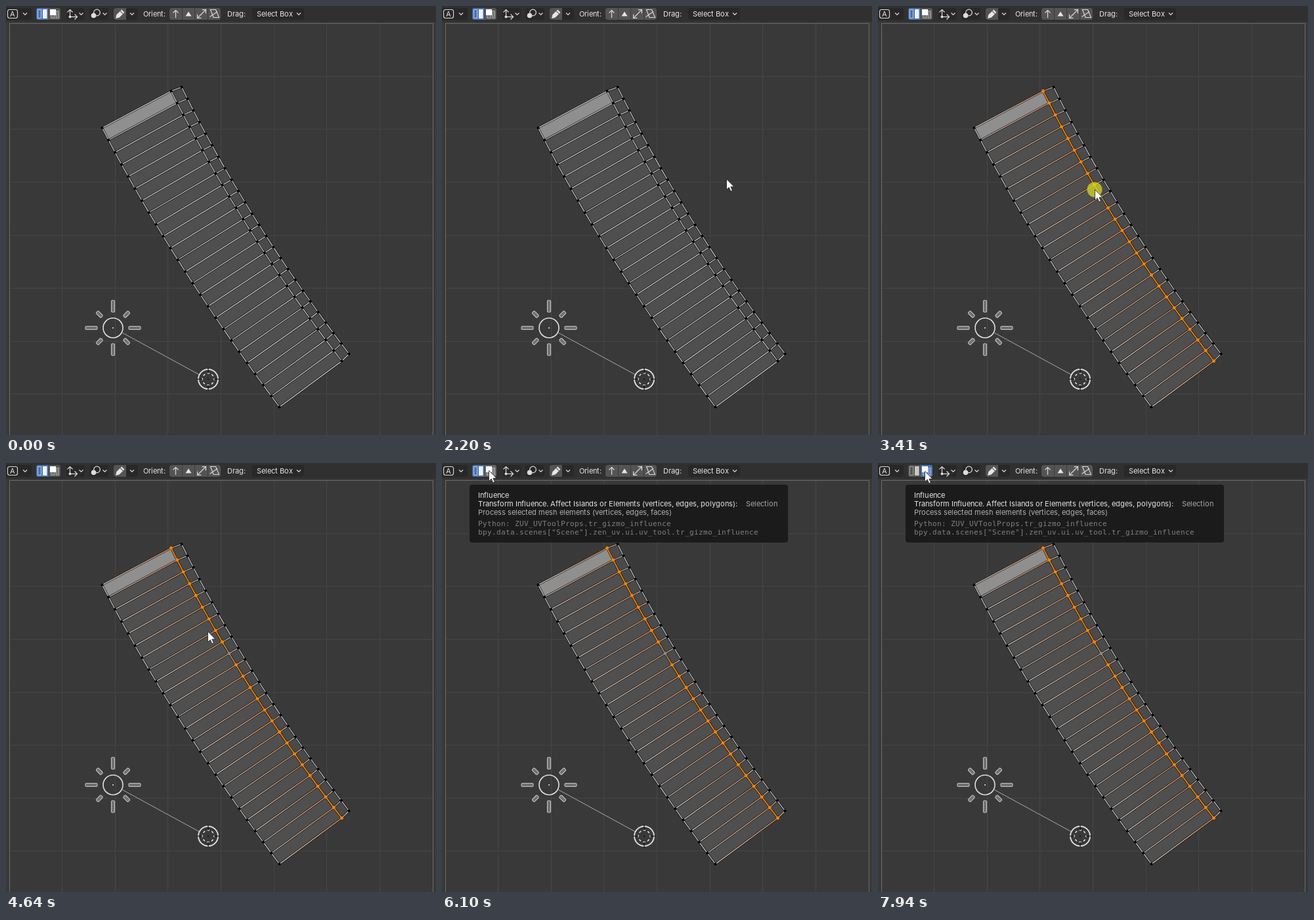
These frames come from a looping animation (655 px wide and 653 px high, 8 s). An HTML page with a canvas:

```html
<!DOCTYPE html>
<html lang="en">
<head>
<meta charset="utf-8">
<title>UV influence tool</title>
<style>
html, body { margin: 0; width: 100%; height: 100%; overflow: hidden; background: #393939; }
canvas { display: block; width: 655px; height: 653px; }
</style>
</head>
<body>
<canvas id="stage" width="655" height="653"></canvas>
<script>
const ctx = document.getElementById('stage').getContext('2d');
const LOOP = 8000, STEP = 76;
const ROWS = 25, ACTIVE = 9;
const UI_FONT = '11px Inter, sans-serif';
const MONO_FONT = '11px "DejaVu Sans Mono", monospace';
const ORANGE = '#ff8500', LIGHT = '#d4d4d4', DARK = '#282828', BUTTON = '#545454', BLUE = '#4772b3';
const ICON = '#dcdcdc';

// The pointer advances in equal time steps; bow bends the path downwards
const entry = [626, 320];
const moves = [
  { at: 600, steps: 3, to: [516, 248] },
  { at: 900, steps: 4, to: [462, 218] },
  { at: 2040, steps: 10, to: [331, 275], bow: 40 },
  { at: 2880, steps: 4, to: [330, 279] },
  { at: 4640, steps: 7, to: [66, 13] },
  { at: 5260, steps: 2, to: [68, 10] },
  { at: 5490, steps: 1, to: [71, 10] },
  { at: 5640, steps: 1, to: [71, 11] },
  { at: 7480, steps: 1, to: [71, 12] }
];

function pointerAt(t) {
  const i = moves.findLastIndex(m => m.at <= t);
  if (i < 0) return null;
  const { at, steps, to, bow = 0 } = moves[i];
  const from = i ? moves[i - 1].to : entry;
  const p = Math.min(1, (Math.floor((t - at) / STEP) + 1) / steps);
  const e = p ** 1.25;
  return [
    Math.round(from[0] + (to[0] - from[0]) * e),
    Math.round(from[1] + (to[1] - from[1]) * e + bow * Math.sin(Math.PI * p))
  ];
}

// Smooth curve through evenly spaced key points, sampled once per row
function curve(...points) {
  const last = points.length - 1;
  return Array.from({ length: ROWS }, (_, row) => {
    const t = row / (ROWS - 1) * last;
    const sum = [.5, .5];
    points.forEach((p, i) => {
      let w = 1;
      for (let j = 0; j <= last; j++) if (j !== i) w *= (t - j) / (i - j);
      sum[0] += p[0] * w;
      sum[1] += p[1] * w;
    });
    return sum;
  });
}
const left = curve([146, 185], [228, 332], [319, 474], [416, 610]);
const middle = curve([251, 129], [329, 272], [416, 409], [511, 540]);
const right = curve([267, 123], [343, 264], [429, 400], [522, 529]);

function path(points, close) {
  ctx.beginPath();
  points.forEach(p => ctx.lineTo(p[0], p[1]));
  if (close) ctx.closePath();
}
function stroke(color, width = 1) {
  ctx.strokeStyle = color;
  ctx.lineWidth = width;
  ctx.stroke();
}
function fill(color) {
  ctx.fillStyle = color;
  ctx.fill();
}
function line(points, color, width) {
  path(points);
  stroke(color, width);
}
function shape(points, color) {
  path(points, true);
  fill(color);
}
function disc(x, y, r, color) {
  ctx.beginPath();
  ctx.arc(x, y, r, 0, Math.PI * 2);
  fill(color);
}
function ring(x, y, r, color, width) {
  ctx.beginPath();
  ctx.arc(x, y, r, 0, Math.PI * 2);
  stroke(color, width);
}
function box(x, y, w, h, color, r = 0) {
  ctx.beginPath();
  ctx.roundRect(x, y, w, h, r);
  fill(color);
}
function at(x, y, angle, paint) {
  ctx.save();
  ctx.translate(x, y);
  ctx.rotate(angle);
  paint();
  ctx.restore();
}
// Hinted type: every glyph advances by whole pixels
function text(str, x, y, color = '#e6e6e6', font = UI_FONT) {
  ctx.font = font;
  ctx.fillStyle = color;
  for (const ch of str) {
    ctx.fillText(ch, x, y);
    x += Math.round(ctx.measureText(ch).width);
  }
}
function fade(a, b, from, to) {
  const g = ctx.createLinearGradient(...a, ...b);
  g.addColorStop(0, from);
  g.addColorStop(1, to);
  return g;
}
function edge(a, b, color, width = 1.1) {
  line([a, b], 'rgba(20,20,20,.75)', width + 1.9);
  line([a, b], color, width);
}

function drawGrid() {
  box(0, 0, 655, 653, '#393939');
  for (let i = 1; i < 8; i++) {
    const x = Math.floor(5 + i * 80.6) + .5;
    const y = Math.floor(26.4 + i * 80.65) + .5;
    line([[x, 26], [x, 653]], '#464646');
    line([[5, y], [650, y]], '#464646');
  }
  line([[5.5, 660], [5.5, 26.5], [650.5, 26.5], [650.5, 660]], '#6c6c6c');
}

function drawMesh(selected) {
  shape([...left, ...middle.toReversed()], '#4f4f4f');
  shape([...middle, ...right.toReversed()], '#4a4a4a');
  shape([left[0], middle[0], middle[1], left[1]], '#8f8f8f');

  const tone = i => !selected ? LIGHT : i === ACTIVE ? '#8f8a84' : ORANGE;
  for (let i = 0; i < ROWS; i++) {
    for (const side of [left, right]) {
      edge(middle[i], side[i], selected ? fade(middle[i], side[i], '#f0985c', '#dcd4d0') : LIGHT);
    }
  }
  for (let i = 1; i < ROWS; i++) {
    edge(left[i - 1], left[i], LIGHT);
    edge(right[i - 1], right[i], LIGHT);
    edge(middle[i - 1], middle[i], fade(middle[i - 1], middle[i], tone(i - 1), tone(i)), selected ? 1.6 : 1.1);
  }
  for (let i = 0; i < ROWS; i++) {
    disc(...left[i], 2, '#000');
    disc(...right[i], 2, '#000');
    disc(...middle[i], selected ? 2.4 : 2, selected ? tone(i) : '#000');
  }
}

function drawGizmo() {
  line([[177.5, 497.5], [295, 561.5]], '#a9a9a9');
  at(163, 490, 0, () => {
    ring(0, 0, 15, '#e0e0e0', 1.6);
    disc(0, 0, 1, '#eee');
    for (let i = 0; i < 8; i++) {
      const length = i % 2 ? 10.5 : 18;
      at(0, 0, i * Math.PI / 4, () => {
        ctx.beginPath();
        ctx.roundRect(24, -2.5, length, 5, 1.5);
        fill('#707070');
        stroke('#c4c4c4', 1.1);
      });
    }
  });
  at(308, 568, 0, () => {
    ring(0, 0, 15, '#e0e0e0', 1.9);
    const dash = Math.PI * 9 / 8;
    ctx.setLineDash([dash, dash]);
    ctx.lineDashOffset = dash / 2;
    ring(0, 0, 9, '#e8e8e8', 1.5);
    ctx.setLineDash([]);
    for (let i = 0; i < 4; i++) {
      at(0, 0, i * Math.PI / 2, () => line([[9, 0], [17, 0]], '#101010', 1.2));
    }
    disc(0, 0, 1.1, '#111');
  });
}

function chevron(x) {
  line([[x - 3, 10.5], [x, 13.5], [x + 3, 10.5]], ICON, 1.2);
}
// Arrow along the local x axis with its tip at the given length
function arrow(x, y, angle, length) {
  at(x, y, angle, () => {
    line([[0, 0], [length, 0]], ICON, 1.2);
    line([[length - 4, -4], [length, 0], [length - 4, 4]], ICON, 1.2);
  });
}

function drawInfluence(elements, hover) {
  box(46, 3, 18.5, 18, elements ? BUTTON : BLUE, [3, 0, 0, 3]);
  box(65, 3, 18, 18, elements ? BLUE : hover ? '#656565' : BUTTON, [0, 3, 3, 0]);
  ctx.beginPath();
  ctx.rect(48.5, 5.5, 5, 13);
  stroke(elements ? '#a5a59a' : '#bfd0ea');
  box(56, 5, 6.5, 14, elements ? '#c9c9b8' : '#f2f2f2');
  ctx.beginPath();
  ctx.rect(68.5, 12.5, 6, 6);
  ctx.rect(76.5, 7.5, 4, 11);
  fill('rgba(255,255,255,.2)');
  stroke('rgba(255,255,255,.4)');
  box(67, 5, 9, 9, '#fff');
}

function drawHeader(elements, hover) {
  box(0, 0, 655, 24, '#303030');
  for (const [x, width] of [[-4, 43], [92, 28], [127, 29], [164, 37], [375, 79]]) {
    box(x, 3, width, 18, DARK, 4);
    chevron(x + width - (x === 164 ? 9 : x === 375 ? 8 : 5.5) - (x < 0 ? 4.5 : 0));
  }

  ctx.beginPath();
  ctx.roundRect(2.5, 5.5, 15, 13, 3);
  stroke(ICON, 1.1);
  text('A', 6, 16);
  drawInfluence(elements, hover);

  arrow(97.5, 16.5, -Math.PI / 2, 11);
  arrow(97.5, 16.5, 0, 11);
  disc(97.5, 16.5, 2, ICON);

  ring(138.5, 10, 4.8, ICON, 1.3);
  disc(133.5, 14.5, 3.8, ICON);

  box(164, 3, 19, 18, BUTTON, [4, 0, 0, 4]);
  at(167, 19, -Math.PI / 4, () => {
    shape([[0, 0], [5, -3], [16, -3], [16, 3], [5, 3]], '#e6e6e6');
    line([[13, -3], [13, 3]], BUTTON);
  });

  text('Orient:', 209, 16);
  box(249, 3, 78, 18, BUTTON, 4);
  for (let i = 1; i < 4; i++) box(249 + Math.round(i * 19.5) - 1, 3, 1, 18, '#3c3c3c');
  arrow(258.5, 18, -Math.PI / 2, 11.5);
  shape([[273.5, 15.5], [278, 8.5], [282.5, 15.5]], '#e6e6e6');
  arrow(298, 12, -Math.PI / 4, 9);
  arrow(298, 12, Math.PI * 3 / 4, 9);
  path([[311.5, 5.5], [319.5, 5.5], [324.5, 17.5], [316, 17.5]], true);
  stroke(ICON, 1.1);
  line([[310.5, 16.5], [322, 8.5]], ICON, 1.1);

  text('Drag:', 337, 16);
  text('Select Box', 382, 16);
}

function drawTooltip() {
  box(42, 33, 485, 88, '#1b1b1b', 4);
  text('Influence', 55, 53);
  text('Transform Influence. Affect Islands or Elements (vertices, edges, polygons):', 55, 66);
  text('Selection', 463, 66, '#a6a6a6');
  text('Process selected mesh elements (vertices, edges, faces)', 55, 79, '#b0b0b0');
  text('Python: ZUV_UVToolProps.tr_gizmo_influence', 55, 96, '#808080', MONO_FONT);
  text('bpy.data.scenes["Scene"].zen_uv.ui.uv_tool.tr_gizmo_influence', 55, 109, '#808080', MONO_FONT);
}

function drawPointer(x, y) {
  at(x + .5, y + .5, 0, () => {
    shape([[0, 0], [0, 16], [3.7, 12.6], [6.3, 18.5], [8.8, 17.4], [6.3, 11.7], [11.2, 11.5]], '#fff');
    stroke('#222', .8);
  });
}

function draw(t) {
  const within = (from, to) => t >= from && t < to;
  drawGrid();
  drawMesh(t >= 3340);
  drawGizmo();
  drawHeader(t >= 7030, t >= 5100);
  if (within(6100, 7030) || t >= 7940) drawTooltip();

  const pointer = pointerAt(t);
  if (!pointer) return;
  const [x, y] = pointer;
  if (within(3260, 3500) || within(7030, 7250)) disc(x, y + .5, 11.5, 'rgba(222,222,30,.72)');
  drawPointer(x, y);
}

const start = performance.now();
function tick() {
  draw((performance.now() - start) % LOOP);
  requestAnimationFrame(tick);
}
tick();
</script>
</body>
</html>
```
